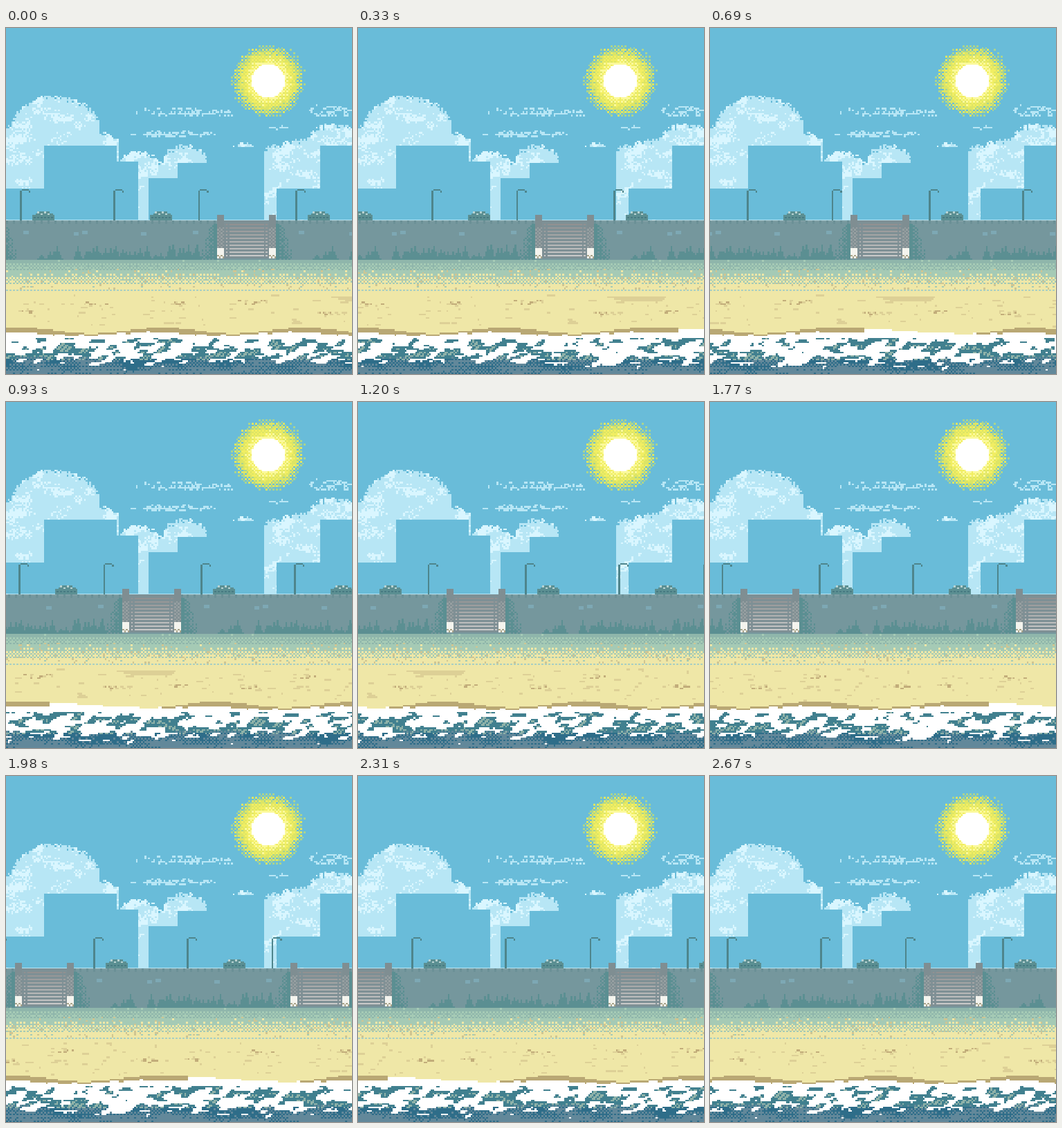
Animation, 500 px wide and 500 px high, one loop 2.7 s. Source, as an HTML page with a canvas:

```html
<!DOCTYPE html>
<html lang="en">
<head>
<meta charset="utf-8">
<title>Seaside promenade</title>
<style>
  html, body { margin: 0; height: 100%; overflow: hidden; background: #69bcd9; }
  canvas { display: block; width: 500px; height: 500px; }
</style>
</head>
<body>
<canvas id="stage" width="500" height="500"></canvas>
<script>
const stage = document.getElementById('stage').getContext('2d');
stage.imageSmoothingEnabled = false;

const ROWS = 200, CELL = 2.5, STEP = 30, STEPS = 90;
const mix = (a, b, t) => a + (b - a) * t;
const smooth = t => t * t * (3 - 2 * t);

// Ordered 4x4 dither threshold, built from its 2x2 rule.
const bayer2 = (x, y) => 2 * ((x ^ y) & 1) + (y & 1);
const bayer = (x, y) => (4 * bayer2(x, y) + bayer2(x >> 1, y >> 1) + 0.5) / 16;

function hash(x, y = 0) {
  let h = Math.imul(x, 374761393) + Math.imul(y, 668265263) | 0;
  h = Math.imul(h ^ h >>> 13, 1274126177);
  return ((h ^ h >>> 16) >>> 0) / 4294967296;
}

// Value noise that repeats after `period` units in x.
function noise(x, y, period = 1000) {
  const i = Math.floor(x), j = Math.floor(y), u = smooth(x - i), v = smooth(y - j);
  const at = (a, b) => hash(a % period, b);
  return mix(mix(at(i, j), at(i + 1, j), u), mix(at(i, j + 1), at(i + 1, j + 1), u), v);
}

let seed = 7;
const random = (a = 0, b = 1) => mix(a, b, hash(seed++, 91));

// A pixel-art strip; plotted boxes wrap around its sides.
function layer(width, paint) {
  const canvas = document.createElement('canvas');
  canvas.width = width;
  canvas.height = ROWS;
  const g = canvas.getContext('2d');
  paint((color, x, y, w = 1, h = 1) => {
    [x, y, w, h] = [x, y, w, h].map(Math.round);
    x = ((x % width) + width) % width;
    g.fillStyle = color;
    g.fillRect(x, y, w, h);
    if (x + w > width) g.fillRect(x - width, y, w, h);
  });
  return canvas;
}

const BLUE = '#69bcd9';

const sky = layer(200, plot => {
  const light = '#b7e6f5', bright = '#d9f6ff';
  plot(BLUE, 0, 0, 200, 200);

  // Cloud bank: centre, top and half width of each puff.
  const puffs = [
    [28, 39, 26], [0, 55, 18], [55, 60, 10], [76, 71, 14], [103, 67, 13],
    [136, 66, 8], [155, 67, 9], [167, 64, 14], [189, 55, 16]
  ];
  const bankTop = x => Math.min(...puffs.map(([c, top, r]) => {
    const u = Math.abs(x - c) / r;
    return u < 1 ? top + r * 0.75 * (1 - Math.sqrt(1 - u * u)) : 77;
  }));
  for (let x = 0; x < 200; x++) {
    const top = Math.round(bankTop(x) + hash(x, 1) * 2 - 0.5);
    for (let y = top; y < 111; y++) {
      const shine = noise(x / 6, y / 4) * 0.65 + hash(x, y) * 0.35 - (y - top) * 0.004;
      if (y > top + 1 || hash(y, x) > 0.25) plot(shine > 0.54 ? bright : light, x, y);
    }
  }

  // Thin streaks: from, to, height, half thickness.
  for (const [from, to, mid, half] of [[75, 132, 48.5, 2], [70, 122, 61, 1.5], [148, 163, 57, 1], [175, 200, 47, 3]])
    for (let y = Math.floor(mid - half); y <= mid + half; y++) for (let x = from; x < to; x++) {
      const edge = Math.abs(y - mid) / half * 0.25 + Math.abs(2 * (x - from) / (to - from) - 1) * 0.2;
      if (noise(x / 4, y) * 0.5 + hash(x, y) * 0.5 > 0.34 + edge) plot(light, x, y);
    }

  for (let y = 4; y < 58; y++) for (let x = 126; x < 178; x++) {
    const r = Math.hypot(x - 151, y - 30);
    const soft = r + (bayer(x, y) * 0.7 + hash(x, y) * 0.3 - 0.5) * 8;
    if (r < 9.6) plot('#ffffff', x, y);
    else if (soft < 11.3) plot('#fbf99a', x, y);
    else if (soft < 14) plot('#f1ee62', x, y);
    else if (soft < 17.5) plot('#dde565', x, y);
    else if (soft < 19.2) plot('#a9d490', x, y);
  }
});

// Missing buildings cut the clouds: left edge and roof height in stage pixels.
const skyline = [
  [0, 232], [55, 170], [160, 193], [191, 277], [206, 217],
  [248, 195], [297, 172], [373, 277], [391, 232], [454, 170]
];

const promenade = layer(159, plot => {
  const dark = '#5b8f92', lamp = '#4e858c';
  for (const x of [8, 62, 111]) {
    plot(lamp, x, 94, 1, 17);
    plot(lamp, x + 1, 93, 4);
    plot(lamp, x + 5, 94);
  }
  for (const x of [15, 83]) {
    for (let r = 0; r < 5; r++) plot(dark, x + Math.max(0, 3 - r * 1.5), 106 + r, 13 - 2 * Math.max(0, 3 - r * 1.5));
    for (let i = 0; i < 4; i++) plot('#b9d3d2', x + 3 + 2 * i, 106 + i % 2);
    for (let i = 1; i < 12; i += 2) plot('#477a82', x + i, 109);
  }

  plot('#75979d', 0, 111, 159, 23);
  for (let x = 0; x < 159; x++) plot(x % 4 ? '#7f9fa4' : '#6b9096', x, 111, 1, x % 4 ? 1 : 2);
  [10, 39, 44, 78, 108].forEach((x, i) => plot('#7da8b4', x, 117 + i % 2, 3, 2));

  // Weeds along the foot of the wall.
  for (let i = 0; i < 44; i++) {
    const x = random(15, 110), height = 2 + 9 * random() * random(0.4, 1);
    plot(dark, x, 134 - height, 1, height);
    plot(dark, x - 1, 134 - height * 0.6, 3, height * 0.6);
    plot(dark, x - 2, 134 - height * 0.25, 5, height * 0.25);
  }
  // Shade on both sides of the stairs.
  for (let y = 113; y < 134; y++) for (let d = 0; d < 14; d++)
    if (1 - d / (3 + (y - 111) * 0.4) > bayer(d, y)) {
      plot(dark, 121 - d, y);
      plot(dark, 156 + d, y);
    }

  plot('#7e9095', 126, 111, 26, 22);
  for (let y = 113; y < 133; y += 2) {
    const v = Math.round(mix(145, 208, (y - 113) / 20));
    plot(`rgb(${v},${v},${v})`, 126, y, 26);
    for (const x of [126, 128, 149, 151]) plot('#829095', x, y);
  }
  for (const x of [122, 152]) {
    plot('#7f8e92', x, 108, 4, 25);
    for (let y = 115; y < 127; y++) for (let i = y % 2; i < 4; i += 2) plot('#969fa1', x + i, y);
    plot('#f4f4ee', x, 127, 4, 6);
    for (let i = 0; i < 4; i++) plot('#aaa58b', x + i, 131 + i % 2);
  }
});

const beach = layer(360, plot => {
  const sand = '#efe7a7', tan = '#ddd096', brown = '#c2ad7a';
  plot(sand, 0, 134, 360, 66);
  for (let y = 134; y < 151; y++) for (let x = 0; x < 360; x++) {
    const depth = (y - 134) / 17, threshold = bayer(x, y) * 0.8 + hash(x, y) * 0.2;
    let color = depth * 2 + 0.1 > threshold ? '#a5cab5' : '#8fb6ab';
    if ((depth - 0.33) * 1.6 > threshold) color = sand;
    if (y > 138 && hash(y, x) > 0.95) color = '#cfc592';
    plot(color, x, y);
  }
  for (let x = 0; x < 360; x += 2) plot('#a9cfc2', x, 151);

  for (let i = 0; i < 110; i++) plot(tan, random(0, 360), random(154, 172), 1 + 5 * random() * random());
  for (let r = 0; r < 3; r++) plot(tan, 188 + 4 * r, 155 + r, 34 - 5 * r);
  // Clusters of darker pebbles.
  for (let c = 0; c < 9; c++) {
    const x = c * 40 + random(5, 20), y = random(157, 167), spread = random(8, 20);
    for (let i = 0; i < spread * 0.7; i++)
      plot(i % 2 ? brown : tan, x + random(0, spread), y + random(-0.9, 1.2), random(1, 2.4));
  }
});

const shore = layer(360, plot => {
  // The tide line swings between low and high at these stage positions.
  const turns = [-70, 20, 122, 225, 327, 430, 532, 635, 830, 920];
  const lift = x => {
    const i = turns.findIndex(t => t > x), u = smooth((x - turns[i - 1]) / (turns[i] - turns[i - 1]));
    return i % 2 ? u : 1 - u;
  };
  for (let x = 0; x < 360; x++) {
    const px = x * CELL, top = Math.round(mix(441.5, 432.5, lift(px)) / CELL);
    const wet = px > 680 && px < 845 ? 0 : Math.round(mix(1, 3, lift(px - 15 < 0 ? px : px - 15)));
    plot('#b9a874', x, top, 1, wet);
    plot('#ffffff', x, top + wet, 1, 200 - top - wet);
  }

  // Slanted ripples, closing into deep water towards the viewer.
  for (let y = 179; y < 200; y++) for (let x = 0; x < 360; x++) {
    const depth = (y - 179) / 21;
    const wave = noise((x + y) / 5 + 90, y / 2.1, 72) * 0.85 + noise(x / 2, y, 180) * 0.15;
    const over = wave - mix(0.66, 0.32, depth) + Math.max(0, depth - 0.6) * 1.1;
    if (over < 0) continue;
    const slate = noise(x / 9, y / 4 + 60, 40) * 0.6 + depth - 0.55;
    let color = depth > 0.55 ? '#2e6d89' : '#41808f';
    if (depth < 0.6 && over > 0.19 && (x + y) % 3) color = '#8fb2a9';
    if (depth > 0.5 && slate > 0.25 + bayer(x, y) * 0.5) color = '#62889a';
    plot(color, x, y);
  }
});

function scroll(image, period, shift) {
  for (let x = -Math.round(shift % period); x < 500; x += period)
    stage.drawImage(image, x, 0, period, 500);
}

function draw() {
  const step = Math.floor(performance.now() / STEP) % STEPS;
  stage.drawImage(sky, 0, 0, 500, 500);
  stage.fillStyle = BLUE;
  skyline.forEach(([x, y], i) => stage.fillRect(x, y, (skyline[i + 1]?.[0] ?? 500) - x, 277 - y));
  scroll(promenade, 398, step * 398 / STEPS);
  scroll(beach, 900, step * 10);
  scroll(shore, 900, step * 20);
  requestAnimationFrame(draw);
}
draw();
</script>
</body>
</html>
```
